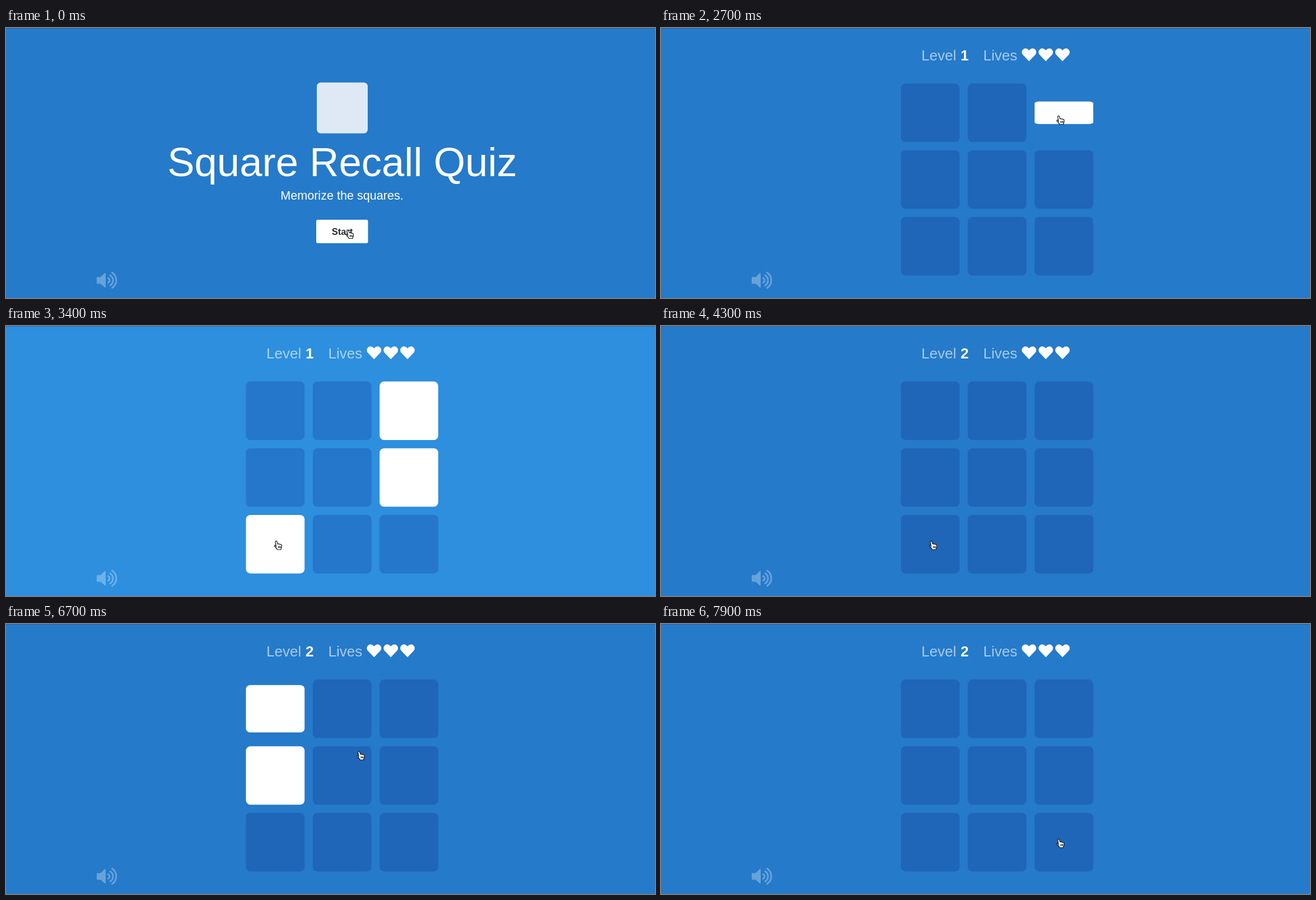
An HTML page for the animation above (8000 ms loop, 1159 by 483 pixels).

```html
<!DOCTYPE html>
<html lang="en">
<head>
<meta charset="utf-8">
<title>Square Recall Quiz</title>
<style>
  html, body { margin: 0; width: 100%; height: 100%; overflow: hidden; background: #257aca; }
  svg { display: block; width: 1159px; height: 483px; }
  text { font-family: "Liberation Sans", Arial, sans-serif; fill: #fff; }
  .middle { text-anchor: middle; }
  .label { font-size: 26px; opacity: .6; }
</style>
</head>
<body>
<svg viewBox="0 0 1159 483">
  <defs>
    <path id="heart" fill="#fff" d="M0 11.5L-11 0C-14-3.500-13.200-8-10-10.300C-7-12.300-3.200-11.500 0-8C3.200-11.500 7-12.300 10-10.300C13.200-8 14-3.500 11 0Z"/>
  </defs>
  <rect id="backdrop" width="1159" height="483"/>
  <rect width="1159" height="1" fill="#2b6195"/>

  <g opacity=".3" fill="#fff">
    <path d="M163.500 445.500H169L176 438.700Q178 437.500 178 439.500V463Q178 465 176 463.700L169 457.500H163.500Q162 457.500 162 456V447Q162 445.500 163.500 445.500Z"/>
    <path fill="none" stroke="#fff" stroke-width="3" stroke-linecap="round"
      d="M182.500 447.500A4.500 4.500 0 0 1 182.500 455.500M186 442.500A10.500 10.500 0 0 1 186 460.500M189.500 437.500A16.500 16.500 0 0 1 189.500 465"/>
  </g>

  <g id="home">
    <rect x="555" y="97.500" width="91" height="91" rx="7" fill="#dee9f5"/>
    <text class="middle" x="600.500" y="265" font-size="72.500">Square Recall Quiz</text>
    <text class="middle" x="600" y="307" font-size="21.600">Memorize the squares.</text>
    <rect x="554" y="343" width="92.500" height="42" rx="3" fill="#fff"/>
    <text class="middle" x="600.500" y="370" font-size="16.500" font-weight="bold" style="fill:#24292f">Start</text>
  </g>

  <g id="game">
    <text class="label" x="465" y="58">Level</text>
    <text id="level" x="535" y="58" font-size="26" font-weight="bold"></text>
    <text class="label" x="575.500" y="58">Lives</text>
    <use href="#heart" x="657.300" y="48"/>
    <use href="#heart" x="687.200" y="48"/>
    <use href="#heart" x="717" y="48"/>
    <g id="tiles"></g>
  </g>

  <path id="cursor" fill="#fff" stroke="#111" stroke-width="1.200" stroke-linejoin="round"
    d="M-3.500 3L-5-5.500Q-5-7.300-3.500-7.300Q-2.300-7.300-2-6L-.8-1.800Q.5-3.300 1.600-1.500Q3-2.700 4-1Q6-1.800 6.400.5Q6.800 4 5 6.800V8H-1.500Q-2.500 6-4.500 4.300L-6.500 1.800Q-7 .2-5.600 0Q-4.700 0-3.500 3ZM.3 2V5M2.300 2V5M4.200 2V5"/>
</svg>
<script>
const LOOP = 8000, STEP = 100;
const $ = id => document.getElementById(id);
const PITCH = 119.35, SIZE = 104.7;
const BACK = [37, 122, 202], BACK_GLOW = [10, 28, 26];
const TILE = [31, 102, 184], TILE_GLOW = [8, 23, 25];
const FLASHES = [3100, 7100];
const FLASH_CURVE = [[0, 0], [100, 1], [200, 1.2], [300, .75], [400, 0]];

// Each flip: start time, tiles, turns white?, duration
const round1 = [2, 5, 6], round2 = [0, 3, 5, 8];
const show = (at, tiles) => ({ at, tiles, white: true, length: 300 });
const hide = (at, tiles) => ({ at, tiles, white: false, length: 250 });
const flips = [
  show(700, round1), hide(1900, round1),
  show(2600, [2]), show(2850, [5]), show(3100, [6]), hide(3500, round1),
  show(4500, round2), hide(5700, round2),
  show(6200, [3]), show(6500, [0]), show(6800, [5]), show(7100, [8]), hide(7500, round2)
];

// Cursor stops: time, x, y
const path = [
  [0, 614, 368.5], [2100, 614, 368.5], [2600, 713.5, 164.5], [2750, 713.5, 164.5],
  [2880, 713.5, 275], [2940, 712, 276], [3100, 486, 392], [5850, 486, 392],
  [6150, 483, 275], [6250, 483, 275], [6450, 483, 160], [6550, 484, 160],
  [6780, 713.5, 275], [6880, 713.5, 276], [7080, 713.5, 392], [LOOP, 713.5, 392]
];

const tiles = Array.from({ length: 9 }, () => {
  const rect = document.createElementNS("http://www.w3.org/2000/svg", "rect");
  const attributes = { x: -SIZE / 2, y: -SIZE / 2, width: SIZE, height: SIZE, rx: 8 };
  for (const name in attributes) rect.setAttribute(name, attributes[name]);
  return $("tiles").appendChild(rect);
});

const clamp = x => Math.max(0, Math.min(1, x));
const glowing = (color, glow, amount) =>
  `rgb(${color.map((c, i) => Math.round(c + glow[i] * amount))})`;

// Linear interpolation over rows of [time, ...values]
function sample(rows, t) {
  const next = rows.findIndex(row => row[0] > t);
  if (next < 0) return rows[rows.length - 1].slice(1);
  const a = rows[Math.max(0, next - 1)], b = rows[next];
  const k = clamp((t - a[0]) / (b[0] - a[0] || 1));
  return a.slice(1).map((v, i) => v + (b[i + 1] - v) * k);
}

function draw(t) {
  const flashStart = FLASHES.filter(at => at <= t).pop();
  const glow = flashStart === undefined ? 0 : sample(FLASH_CURVE, t - flashStart)[0];
  $("backdrop").setAttribute("fill", glowing(BACK, BACK_GLOW, glow));

  $("home").setAttribute("opacity", t < 100 ? 1 : 0);
  $("game").setAttribute("opacity", t < 100 ? 0 : clamp(t / 300));
  $("level").textContent = t < 3900 ? 1 : 2;

  tiles.forEach((tile, i) => {
    const flip = flips.filter(f => f.at < t && f.tiles.includes(i)).pop();
    const progress = flip ? clamp((t - flip.at) / flip.length) : 1;
    const scale = Math.sin(Math.PI / 2 * progress ** 1.26);
    const x = 428.5 + SIZE / 2 + i % 3 * PITCH;
    const y = 99.3 + SIZE / 2 + Math.floor(i / 3) * PITCH;
    tile.setAttribute("transform", `translate(${x} ${y}) scale(1 ${scale})`);
    tile.setAttribute("fill", flip && flip.white ? "#fff" : glowing(TILE, TILE_GLOW, glow));
  });

  $("cursor").setAttribute("transform", `translate(${sample(path, t).join(" ")})`);
}

const start = performance.now();
function tick() {
  const t = (performance.now() - start) % LOOP;
  draw(Math.floor(t / STEP) * STEP);
  requestAnimationFrame(tick);
}
tick();
</script>
</body>
</html>
```
